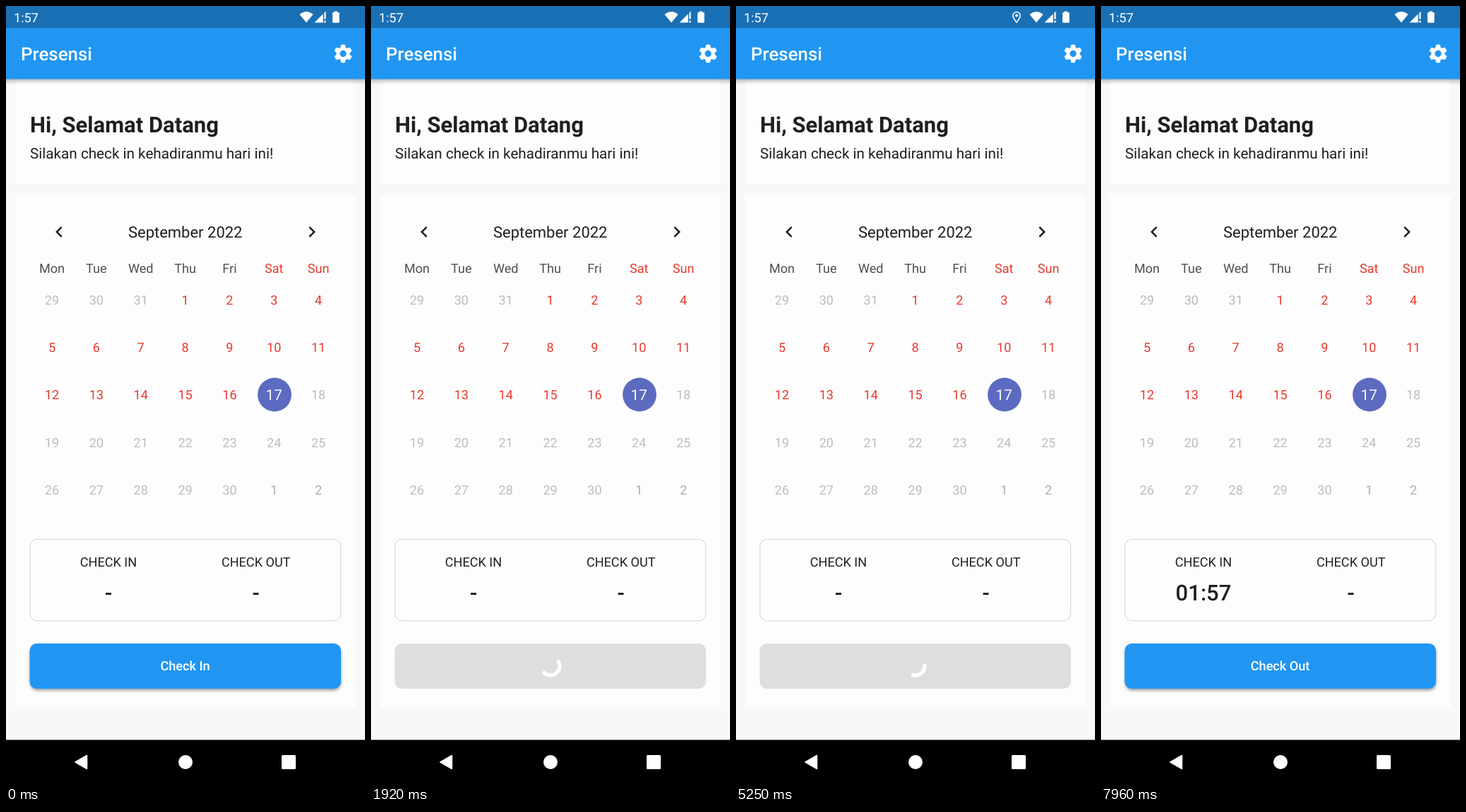
Write an HTML page that moves like this. It is 508x1102 px and loops after 8 s.

```html
<!DOCTYPE html>
<html lang="id">
<head>
<meta charset="utf-8">
<title>Presensi</title>
<style>
  html, body { margin: 0; width: 100%; height: 100%; overflow: hidden; background: #f8f8fa; }
  svg { display: block; width: 100vw; height: 100vh; }
  text { font-family: Roboto, sans-serif; font-size: 18.1px; fill: #1f1f1f; text-rendering: geometricPrecision; }
  .mid { text-anchor: middle; }
  .medium { font-weight: 500; }
</style>
</head>
<body>
<svg id="stage" viewBox="0 0 508 1102">
  <defs>
    <filter id="soft" x="-10%" y="-40%" width="120%" height="180%"><feGaussianBlur stdDeviation="2"/></filter>
    <linearGradient id="barShade" x1="0" y1="0" x2="0" y2="1">
      <stop offset="0" stop-opacity=".3"/>
      <stop offset=".45" stop-opacity=".11"/>
      <stop offset="1" stop-opacity="0"/>
    </linearGradient>
  </defs>

  <rect width="508" height="1102" fill="#f8f8fa"/>
  <g fill="#fdfdfd">
    <rect x="13" y="103" width="482" height="149"/>
    <rect x="13" y="268" width="482" height="725"/>
  </g>

  <!-- app bar -->
  <rect y="103" width="508" height="9" fill="url(#barShade)"/>
  <rect y="31" width="508" height="72.5" fill="#2096f2"/>
  <rect width="508" height="31" fill="#1a70b5"/>
  <text x="11" y="22.5" style="fill:#fff">1:57</text>
  <text x="21" y="77" class="medium" style="fill:#fff;font-size:25.87px">Presensi</text>
  <g id="gear" transform="translate(477 67.5) scale(1.2935)" fill="#fff">
    <circle r="5.4" fill="none" stroke="#fff" stroke-width="3.6"/>
  </g>
  <g fill="#fff">
    <path d="M415.5 12Q425 4 434.5 12L425 23.5z"/>
    <path d="M436.5 23.5L448.7 11.3V23.5z"/>
    <path d="M450.3 9.7L452.5 7.5V18.5H450.3zM450.3 20.8H452.5V23.5H450.3z"/>
    <path d="M464.5 9V7.5H469V9H470.5Q471.7 9 471.7 10.2V22.5Q471.7 23.8 470.5 23.8H463.2Q462 23.8 462 22.5V10.2Q462 9 463.2 9z"/>
  </g>
  <g id="pin">
    <path d="M397 23.2C393.5 18.8 391.8 16 391.8 13.6A5.2 5.2 0 0 1 402.2 13.6C402.2 16 400.5 18.8 397 23.2z" fill="none" stroke="#fff" stroke-width="1.5"/>
    <circle cx="397" cy="13.5" r="1.9" fill="#fff"/>
  </g>

  <!-- greeting -->
  <text x="34" y="179" style="font-weight:700;font-size:31.04px">Hi, Selamat Datang</text>
  <text x="34" y="216" style="font-size:20.7px">Silakan check in kehadiranmu hari ini!</text>

  <!-- calendar -->
  <g fill="#1f1f1f">
    <path transform="translate(59.7 304.5) scale(1.2935)" d="M15.41 7.41L14 6l-6 6 6 6 1.41-1.41L10.83 12z"/>
    <path transform="translate(417.3 304.5) scale(1.2935)" d="M10 6L8.59 7.41 13.17 12l-4.58 4.59L10 18l6-6z"/>
  </g>
  <text x="253.7" y="328" class="mid" style="font-size:21.99px">September 2022</text>
  <circle cx="380" cy="550.5" r="23.9" fill="#5c6bc0"/>
  <g id="calendar"></g>

  <!-- attendance times -->
  <rect x="34" y="755.4" width="439.6" height="115.4" rx="10" fill="none" stroke="#dcdce2" stroke-width="1.3"/>
  <text x="145" y="794" class="mid">CHECK IN</text>
  <text x="353.7" y="794" class="mid">CHECK OUT</text>
  <text id="timeIn" x="145" y="842" class="mid medium" style="font-size:31.04px">-</text>
  <text x="353.7" y="842" class="mid medium" style="font-size:31.04px">-</text>

  <!-- button -->
  <g id="shade">
    <rect x="34" y="905.5" width="440" height="64" rx="10" opacity=".38" filter="url(#soft)"/>
  </g>
  <rect id="button" x="33.5" y="903" width="440.5" height="64" rx="10"/>
  <text id="label" x="253.6" y="941.3" class="mid medium" style="fill:#fff"></text>
  <path id="spinner" fill="none" stroke="#fff" stroke-width="5.17" stroke-linecap="square"/>

  <!-- navigation bar -->
  <rect y="1039.5" width="508" height="62.5"/>
  <g fill="#fff">
    <path d="M98 1071L114.5 1061.5V1080.5z" stroke="#fff" stroke-width="1.5" stroke-linejoin="round"/>
    <circle cx="254" cy="1071" r="10"/>
    <rect x="390" y="1061" width="20" height="20" rx="1.5"/>
  </g>
</svg>
<script>
const LOOP = 8000, LOAD = 1657, DONE = 6450, FADE = 200;
const PIN_ON = 1950, PIN_OFF = 5400;
const NS = 'http://www.w3.org/2000/svg';
const $ = id => document.getElementById(id);
const clamp = v => Math.min(1, Math.max(0, v));

function add(parent, tag, attrs, content = '') {
  const el = document.createElementNS(NS, tag);
  for (const key in attrs) el.setAttribute(key, attrs[key]);
  el.textContent = content;
  parent.appendChild(el);
}

function buildGear() {
  for (let a = 0; a < 360; a += 60) {
    add($('gear'), 'path', {
      d: 'M-3 -6.3L-2.4 -7.1 -1.9 -9.6H1.9L2.4 -7.1 3 -6.3z',
      stroke: '#fff', 'stroke-width': .7, 'stroke-linejoin': 'round',
      transform: `rotate(${a})`
    });
  }
}

function buildCalendar() {
  const red = '#e8392f', grey = '#bdbdbb', today = 17;
  const cell = (col, y, content, style) =>
    add($('calendar'), 'text', { x: 65 + col * 62.85, y, class: 'mid', style }, content);

  'Mon Tue Wed Thu Fri Sat Sun'.split(' ').forEach((name, col) =>
    cell(col, 378.2, name, `fill:${col > 4 ? red : '#4f4f4f'}`));

  for (let i = 0; i < 35; i++) {
    const day = i - 2, col = i % 7, y = 422.5 + Math.floor(i / 7) * 67.35;
    const shown = day < 1 ? day + 31 : day > 30 ? day - 30 : day;
    if (day === today) cell(col, y + .9, shown, 'fill:#fafafa;font-size:20.7px');
    else cell(col, y, shown, `fill:${day > 30 ? '#aeaeae' : day < 1 || day > today ? grey : red}`);
  }
}

// cubic-bezier(.4, 0, .2, 1)
function ease(x) {
  x = clamp(x);
  let lo = 0, hi = 1;
  for (let i = 0; i < 24; i++) {
    const s = (lo + hi) / 2, r = 1 - s;
    if (1.2 * s * r * r + .6 * s * s * r + s * s * s < x) lo = s; else hi = s;
  }
  return lo * lo * (3 - 2 * lo);
}

// Indeterminate ring: head and tail chase each other while the whole turns.
function spinnerPath(t) {
  const phase = t / 1333 % 1, radius = 12.93;
  const head = ease(phase * 2), tail = ease(phase * 2 - 1);
  const start = Math.PI * (-.5 + 1.5 * tail + 2 * t / 2222 + .5 * phase);
  const sweep = Math.max(1.5 * Math.PI * (head - tail), .002);
  const at = a => `${(254 + radius * Math.cos(a)).toFixed(3)} ${(935 + radius * Math.sin(a)).toFixed(3)}`;
  return `M${at(start)}A${radius} ${radius} 0 ${sweep > Math.PI ? 1 : 0} 1 ${at(start + sweep)}`;
}

function draw(t) {
  const done = t >= DONE, loading = t >= LOAD && !done;
  const lift = done ? ease((t - DONE) / FADE) : 1 - ease((t - LOAD) / FADE);
  $('shade').setAttribute('opacity', lift);
  $('button').setAttribute('fill', loading && t >= LOAD + FADE ? '#dedede' : '#2096f2');
  $('label').textContent = loading ? '' : done ? 'Check Out' : 'Check In';
  $('timeIn').textContent = done ? '01:57' : '-';
  $('spinner').setAttribute('d', loading ? spinnerPath(t - LOAD) : '');
  $('pin').setAttribute('visibility', t >= PIN_ON && t < PIN_OFF ? 'visible' : 'hidden');
}

buildGear();
buildCalendar();
const began = performance.now();
function tick() {
  draw((performance.now() - began) % LOOP);
  requestAnimationFrame(tick);
}
tick();
</script>
</body>
</html>
```
